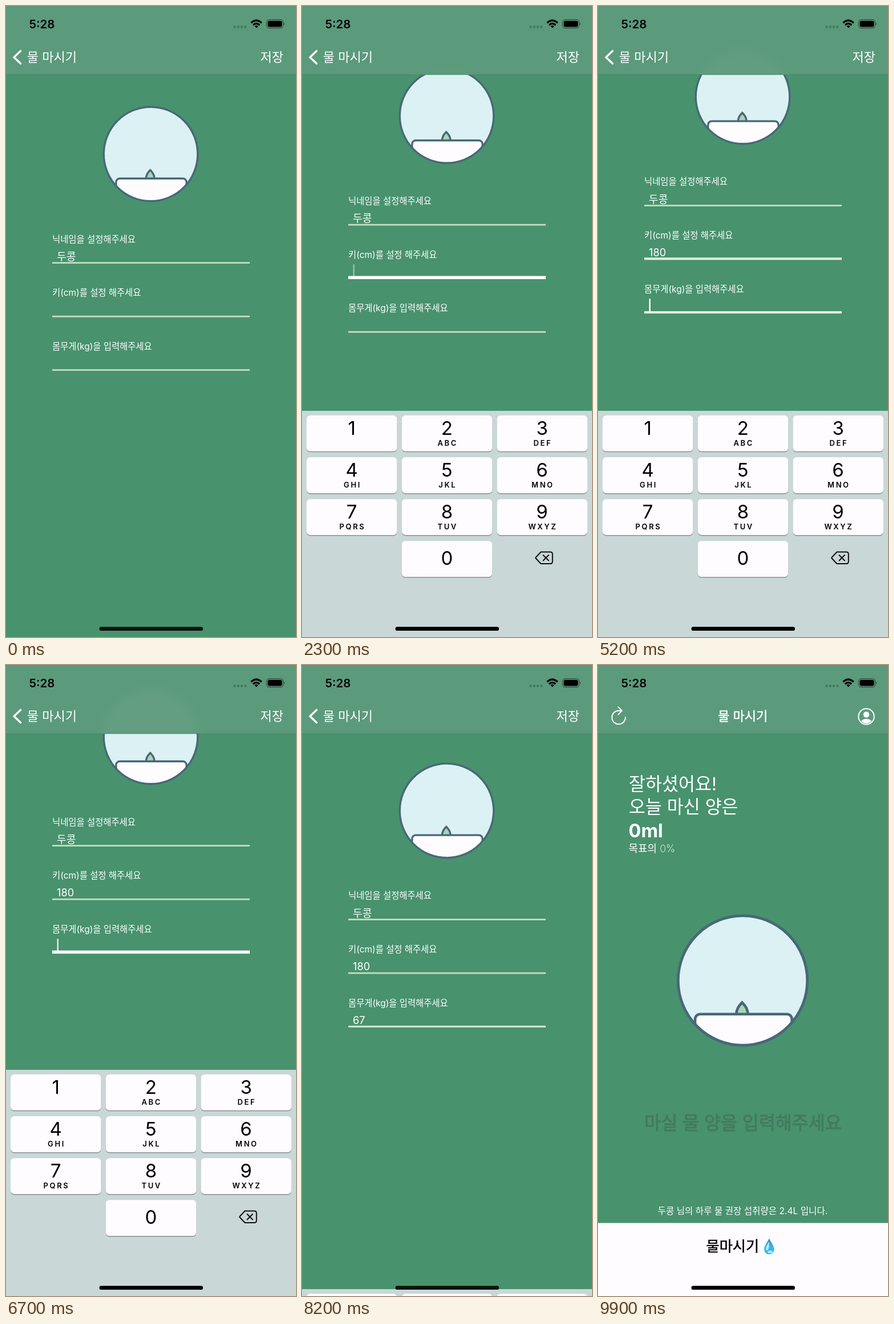
Animation, 508 px wide and 1102 px high, one loop 10000 ms. Source, as an HTML page:

```html
<!DOCTYPE html>
<html lang="ko">
<head>
<meta charset="utf-8">
<title>물 마시기</title>
<style>
  html, body { margin: 0; width: 100%; height: 100%; overflow: hidden; background: #48926d; }
  svg { display: block; width: 508px; height: 1102px; }
  text { font-family: Inter, 'Noto Sans CJK KR', 'Noto Sans CJK', sans-serif; fill: #fff; white-space: pre; }
  .mid { text-anchor: middle; }
  .bar { font-size: 22px; }
  .label { font-size: 15.4px; }
  .value { font-size: 18.2px; }
  .big { font-size: 31.5px; }
  .digit { font-size: 33px; fill: #000; }
  .letters { font-size: 13px; font-weight: 600; letter-spacing: 2.6px; fill: #000; }
  .ink { fill: #000; }
  .medium { stroke: #fff; stroke-width: .5px; }
  .medium.ink { stroke: #000; }
  .hint { fill: #437a5f; stroke: #437a5f; stroke-width: .8px; }
  .icon { fill: none; stroke: #fff; stroke-width: 2; stroke-linecap: round; stroke-linejoin: round; }
</style>
</head>
<body>
<svg viewBox="0 0 508 1102">
  <defs>
    <clipPath id="disc"><circle r="83"/></clipPath>
    <clipPath id="barClip"><path d="M0 0H508V119H0Z"/></clipPath>
    <clipPath id="faceClip"><circle cx="470" cy="90" r="12"/></clipPath>
    <filter id="blur"><feGaussianBlur stdDeviation="9"/></filter>
    <linearGradient id="water" x2="0" y2="1">
      <stop stop-color="#2b86bd"/><stop offset=".5" stop-color="#3fb2e2"/><stop offset="1" stop-color="#35bdec"/>
    </linearGradient>
    <g id="pot" stroke="#476878" stroke-width="3.4">
      <circle r="82.3" fill="#dcf1f3" stroke="none"/>
      <g clip-path="url(#disc)">
        <path d="M-.8 28C-5.5 32.5 -8.6 38 -8 44H6.4C7 38 3.9 32.5 -.8 28Z" fill="#a9d6b0"/>
        <rect x="-60.7" y="42.7" width="123.4" height="80" rx="6.5" fill="#fefcff"/>
      </g>
      <circle r="82.3" fill="none"/>
    </g>
  </defs>

  <g id="home">
    <rect width="508" height="1102" fill="#48926d"/>
    <text class="big" x="54" y="219">잘하셨어요!</text>
    <text class="big" x="54" y="259">오늘 마신 양은</text>
    <text x="53.5" y="301" font-size="32.5" font-weight="700">0ml</text>
    <text x="53.5" y="327" font-size="18" font-weight="200">목표의 0%</text>
    <use id="bigPot" href="#pot"/>
    <text class="big mid hint" x="254" y="811">마실 물 양을 입력해주세요</text>
    <text class="mid" x="253.5" y="959" font-size="15.6">두콩 님의 하루 물 권장 섭취량은 2.4L 입니다.</text>
    <rect y="974.5" width="508" height="128" fill="#fefcff"/>
    <text class="ink medium" x="189.5" y="1024" font-size="25.2">물마시기</text>
    <path d="M299.8 1001.5C297 1008 291 1014 291 1020.5A8.8 8.8 0 0 0 308.6 1020.5C308.6 1014 302.5 1008 299.8 1001.5Z" fill="url(#water)"/>
    <path d="M299.5 1007C297 1012 293.5 1016 294 1021C296 1025 301 1021 299.5 1007Z" fill="#b9eafa"/>
    <ellipse cx="301.5" cy="1025" rx="4.5" ry="2.5" fill="#9be8fb"/>
    <rect id="dim" width="508" height="1102"/>
  </g>

  <g id="profile">
    <rect width="508" height="1102" fill="#48926d"/>
    <g id="form"><use href="#pot" x="253.5" y="258.5"/></g>
  </g>

  <g id="keyboard">
    <rect y="707" width="508" height="395" fill="#c9d7d7"/>
    <path d="M418.5 953.5H435Q438.8 953.5 438.8 957.5V970Q438.8 974 435 974H418.5L409.5 964.5Q408.8 963.7 409.5 963ZM422.5 959L432 968.5M432 959L422.5 968.5"
      fill="none" stroke="#111" stroke-width="2" stroke-linecap="round" stroke-linejoin="round"/>
  </g>

  <g clip-path="url(#barClip)">
    <rect width="508" height="120" fill="#5c9a7c"/>
    <circle id="glow" cx="253.5" r="84" fill="#fff" filter="url(#blur)"/>
  </g>
  <rect y="119" width="508" height="1.3" fill="#4f8b6d"/>
  <path id="chevron" class="icon" d="M25.5 78.5L14 89.5L25.5 100.5" style="stroke-width:3.4"/>
  <g id="refresh" class="icon"><path d="M42 79.7H36.5A11.8 11.8 0 1 0 48 91M35.5 73.5L42 79.7L35.5 86.5"/></g>
  <text id="backTitle" class="bar mid" y="97">물 마시기</text>
  <text id="title" class="bar mid medium" y="97">물 마시기</text>
  <text id="save" class="bar" x="445.5" y="97">저장</text>
  <g id="user">
    <circle class="icon" cx="470" cy="90" r="13.7"/>
    <circle cx="470" cy="86.5" r="5.2" fill="#fff"/>
    <ellipse cx="470" cy="101" rx="10" ry="7" fill="#fff" clip-path="url(#faceClip)"/>
  </g>

  <text class="ink" x="40.5" y="39" font-size="20.5" font-weight="600">5:28</text>
  <g fill="#417c5e"><circle cx="400.3" cy="36.5" r="2.2"/><circle cx="406.7" cy="36.5" r="2.2"/><circle cx="413" cy="36.5" r="2.2"/><circle cx="419.4" cy="36.5" r="2.2"/></g>
  <g fill="none" stroke="#000" stroke-width="3.2">
    <path d="M429.3 29.5Q438.5 21 447.7 29.5M432.8 33.2Q438.5 28 444.2 33.2"/>
    <path d="M435.3 35.3Q438.5 32.7 441.7 35.3L438.5 38.5Z" fill="#000" stroke="none"/>
  </g>
  <rect x="456.5" y="24" width="29" height="14.5" rx="4.5" fill="none" stroke="#000" stroke-opacity=".45" stroke-width="1.3"/>
  <rect x="458.5" y="26" width="25" height="10.5" rx="2.7"/>
  <path d="M487 28.8Q489.3 31.2 487 33.8Z" opacity=".5"/>
  <rect id="indicator" x="163.5" y="1084.3" width="181.5" height="6.7" rx="3.35"/>
</svg>

<script>
const LOOP = 10000;
const $ = id => document.getElementById(id);
const clamp = x => Math.min(1, Math.max(0, x));
const mix = (a, b, k) => a + (b - a) * k;
const ramp = (t, a, b) => clamp((t - a) / (b - a));
const ease = (t, a, b) => { const k = ramp(t, a, b); return k * k * (3 - 2 * k); };
const spring = (t, start, rate) => {
  const x = Math.max(0, t - start) / 1000 * rate;
  return 1 - (1 + x) * Math.exp(-x);
};
const set = (el, attrs) => { for (const k in attrs) el.setAttribute(k, attrs[k]); };
function add(parent, tag, attrs, text = '') {
  const el = document.createElementNS('http://www.w3.org/2000/svg', tag);
  set(el, attrs);
  el.textContent = text;
  return parent.appendChild(el);
}

// Form rows
const PITCH = 93.6;
const rows = ['닉네임을 설정해주세요', '키(cm)를 설정 해주세요', '몸무게(kg)을 입력해주세요'].map((label, i) => {
  const y = i * PITCH;
  add($('form'), 'text', { class: 'label', x: 81, y: 412.5 + y }, label);
  return {
    bottom: 449.9 + y,
    value: add($('form'), 'text', { class: 'value', x: 89, y: 443.7 + y }, i ? '' : '두콩'),
    line: add($('form'), 'rect', { x: 81, width: 346 })
  };
});
const caret = add($('form'), 'rect', { width: 2.5, height: 24, rx: 1, fill: '#fff' });

// Number pad
const letters = ['', '', 'ABC', 'DEF', 'GHI', 'JKL', 'MNO', 'PQRS', 'TUV', 'WXYZ'];
const keys = letters.map((name, n) => {
  const col = n ? (n - 1) % 3 : 1, row = n ? Math.floor((n - 1) / 3) : 3;
  const x = 8 + col * 166.7, y = 715 + row * 73.1, cx = x + 79.2;
  const box = { x, width: 158.5, height: 62.8, rx: 6.5 };
  add($('keyboard'), 'rect', { ...box, y: y + 1.5, fill: '#879294' });
  const face = add($('keyboard'), 'rect', { ...box, y });
  add($('keyboard'), 'text', { class: 'digit mid', x: cx, y: y + (n ? 34 : 41.7) }, n);
  if (name) add($('keyboard'), 'text', { class: 'letters mid', x: cx + 1.3, y: y + 53 }, name);
  return face;
});

// [key, press time, row]
const presses = [[1, 3600, 1], [8, 4200, 1], [0, 4430, 1], [6, 7000, 2], [7, 7500, 2]];
const typed = (t, row) => presses.filter(p => p[2] === row && t >= p[1] + 80).map(p => p[0]).join('');
const CARET_X = [[89.5, 98.5, 110, 122], [89.5, 102, 113.5]];

// [start, end, visible] fades of the caret
const blinks = [[2230, 2400, 1], [2580, 2800, 0], [3280, 3400, 1], [4760, 4810, 0], [5020, 5120, 1],
  [5680, 5800, 0], [5980, 6200, 1], [6680, 6800, 0], [6990, 7050, 1], [7860, 7890, 0]];
const caretAlpha = t => blinks.reduce((v, [a, b, to]) => mix(v, to, ramp(t, a, b)), 0);

function draw(t) {
  const up = spring(t, 1710, 18), down = spring(t, 7905, 18);
  const kb = up * (1 - down);
  const scroll = (66.5 * up + 66.5 * ease(t, 5030, 5370)) * (1 - down);
  const pop = spring(t, 9096, 12);

  set($('form'), { transform: `translate(0 ${-scroll})` });
  set($('glow'), { cy: 258.5 - scroll, opacity: .04 * ramp(scroll, 45, 120) });
  set($('keyboard'), {
    transform: `translate(0 ${Math.round(395 * (1 - kb))})`,
    visibility: kb > .001 ? 'visible' : 'hidden'
  });

  const swap = ease(t, 5030, 5370);
  const active = [0, ease(t, 1750, 2150) * (1 - swap), swap * (1 - ease(t, 7920, 8300))];
  rows.forEach((r, i) => {
    const k = active[i], h = mix(2.7, 5.5, k);
    set(r.line, {
      y: r.bottom - h, height: h,
      fill: `rgb(${mix(201, 255, k)},${mix(223, 255, k)},${mix(196, 255, k)})`
    });
    if (i) r.value.textContent = typed(t, i);
  });

  const row = t < 5000 ? 1 : 2;
  set(caret, {
    x: CARET_X[row - 1][typed(t, row).length],
    y: 423.8 + row * PITCH,
    opacity: caretAlpha(t)
  });

  keys.forEach((face, n) => {
    const p = presses.find(p => p[0] === n);
    const k = p && t >= p[1] ? 1 - ramp(t, p[1] + 90, p[1] + 220) : 0;
    set(face, { fill: `rgb(${mix(254, 176, k)},${mix(252, 190, k)},${mix(255, 194, k)})` });
  });

  set($('profile'), { transform: `translate(${Math.round(508 * pop)} 0)` });
  set($('home'), { transform: `translate(${Math.round(-152.4 * (1 - pop))} 0)` });
  set($('dim'), { opacity: .11 * (1 - pop) });
  set($('bigPot'), { transform: `translate(253.5 551) scale(${mix(1.88, 1.375, ease(t, 9190, 9850))})` });

  const x = mix(80.3, 253.8, Math.pow(pop, 1.23));
  const bold = ramp(pop, .4, .8);
  set($('backTitle'), { x, opacity: 1 - bold });
  set($('title'), { x, opacity: bold });
  set($('chevron'), { opacity: clamp(1.25 * (1 - pop)) });
  set($('refresh'), { opacity: clamp(pop * 1.3) });
  set($('save'), { opacity: clamp(1 - pop * 2.2) });
  set($('user'), { opacity: clamp(pop * 1.5 - .35) });
  set($('indicator'), { opacity: mix(.87, 1, Math.max(kb, pop)) });
}

const start = performance.now();
function frame() {
  draw((performance.now() - start) % LOOP);
  requestAnimationFrame(frame);
}
frame();
</script>
</body>
</html>
```
